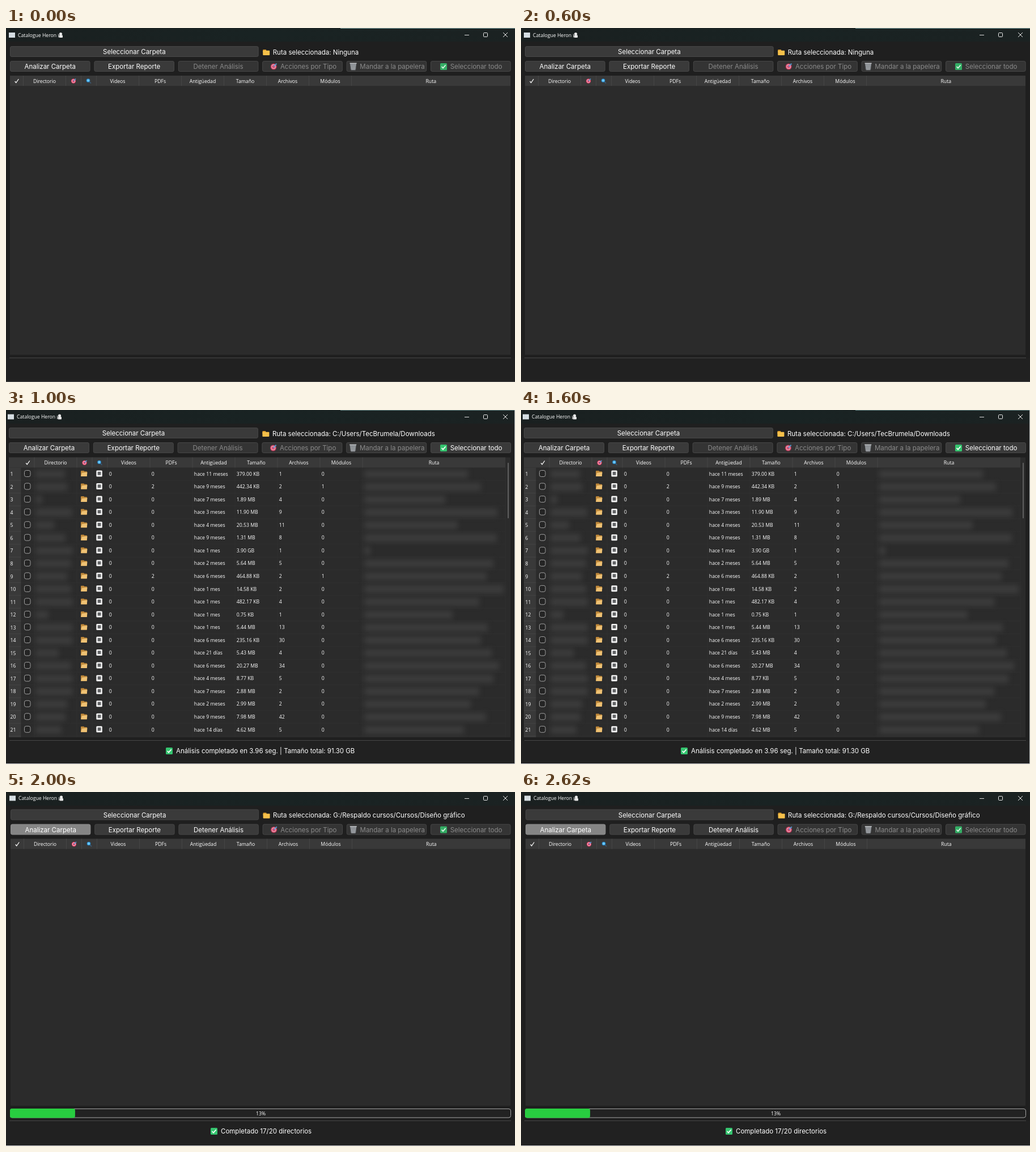
These frames come from a looping animation (898 by 624 pixels, 3030 ms). An HTML page with a canvas:

```html
<!DOCTYPE html>
<html lang="es">
<head>
<meta charset="utf-8">
<title>Catalogue Heron</title>
<style>
html, body { margin: 0; width: 100%; height: 100%; overflow: hidden; background: #1f1f1f; }
canvas { display: block; }
</style>
</head>
<body>
<canvas id="stage" width="898" height="624"></canvas>
<script>
const ctx = document.getElementById('stage').getContext('2d');
const UI = '11.5px Inter, sans-serif';
const SMALL = '8.7px "Open Sans", sans-serif';
const LABELS = ['✓', 'Directorio', '', '', 'Videos', 'PDFs', 'Antigüedad', 'Tamaño', 'Archivos', 'Módulos', 'Ruta'];
const BUTTONS = ['Analizar Carpeta', 'Exportar Reporte', 'Detener Análisis',
  'Acciones por Tipo', 'Mandar a la papelera', 'Seleccionar todo'];

// age | size | files, followed by PDFs and modules where they are not zero
const ROWS = `11 meses|379.00 KB|1
9 meses|442.34 KB|2|2|1
7 meses|1.89 MB|4
3 meses|11.90 MB|9
4 meses|20.53 MB|11
9 meses|1.31 MB|8
1 mes|3.90 GB|1
2 meses|5.64 MB|5
6 meses|464.88 KB|2|2|1
1 mes|14.58 KB|2
1 mes|482.17 KB|4
1 mes|0.75 KB|1
1 mes|5.44 MB|13
6 meses|235.16 KB|30
21 días|5.43 MB|4
6 meses|20.27 MB|34
4 meses|8.77 KB|5
7 meses|2.88 MB|2
2 meses|2.99 MB|2
9 meses|7.98 MB|42
14 días|4.62 MB|5`.split('\n').map(row => row.split('|'));
const NAME_ENDS = [104, 108, 64, 117, 85, 105, 118, 115, 108, 115, 118, 75, 118, 118, 93, 115, 118, 118, 108, 105, 98];
const PATH_ENDS = [815, 838, 775, 867, 797, 866, 643, 860, 848, 878, 835, 788, 850, 838, 857, 870, 860, 835, 820, 847, 808];

const SCENES = [
  { until: 1000, x: 7.5, y: 32.5, row2: 58.5, head: 84, bottom: 576, line: 581.5, titleX: 5, titleY: 12.5,
    tableX: 7, firstCol: 7, right: 890, enabled: [0, 1], path: 'Ninguna', topEdge: '#7fa3a3', bottomEdge: '#4a4a4a' },
  { until: 2000, x: 5.5, y: 31.5, row2: 57.5, head: 83.5, bottom: 577, line: 582.5, titleX: 3, titleY: 12,
    tableX: 5, firstCol: 26.5, right: 881, enabled: [0, 1, 5], path: 'C:/Users/TecBrumela/Downloads', rows: true,
    status: ['Análisis completado en 3.96 seg. | Tamaño total: 91.30 GB', 282, 601],
    topEdge: '#5f7f7f', rightEdge: '#b8bcbc', bottomEdge: '#c4c4c8' },
  { until: 3030, x: 8.5, y: 31, row2: 57, head: 82.5, bottom: 553, line: 579.5, titleX: 6, titleY: 11,
    tableX: 8, firstCol: 8, right: 890, enabled: [0, 1, 2], pressed: 0, path: 'G:/Respaldo cursos/Cursos/Diseño gráfico',
    progress: 13, status: ['Completado 17/20 directorios', 361, 598], bottomEdge: '#c4c4c8' }
];

function rect(x, y, w, h, color) {
  ctx.fillStyle = color;
  ctx.fillRect(x, y, w, h);
}
function round(x, y, w, h, r, fill, stroke) {
  ctx.beginPath();
  ctx.roundRect(x, y, w, h, r);
  if (fill) { ctx.fillStyle = fill; ctx.fill(); }
  if (stroke) { ctx.strokeStyle = stroke; ctx.lineWidth = 1; ctx.stroke(); }
}
function disc(x, y, r, color) {
  ctx.beginPath();
  ctx.arc(x, y, r, 0, 7);
  ctx.fillStyle = color;
  ctx.fill();
}
function stroke(points, color, width = 1) {
  ctx.beginPath();
  points.forEach(([x, y]) => ctx.lineTo(x, y));
  ctx.strokeStyle = color;
  ctx.lineWidth = width;
  ctx.stroke();
}
function text(str, x, y, font, color = '#fff', align = 'left') {
  ctx.font = font;
  ctx.fillStyle = color;
  ctx.textAlign = align;
  ctx.textBaseline = 'alphabetic';
  ctx.fillText(str, x, y + (font === UI ? 4.2 : 3.2));
}

// Icons are drawn around their centre
function target(x, y, r) {
  disc(x, y, r, '#d9365e');
  disc(x, y, r * .72, '#f3c3cf');
  disc(x, y, r * .5, '#d9365e');
  stroke([[x, y], [x + r * .95, y - r * .95]], '#4fa3e0', r * .35);
}
function folder(x, y, w, h) {
  round(x - w / 2, y - h / 2, w * .5, h * .5, 1, '#d99a2b');
  round(x - w / 2, y - h / 2 + h * .17, w, h * .83, 1, '#f5c04a');
}
function openFolder(x, y) {
  round(x - 5.5, y - 5, 6, 5, 1, '#b98236');
  round(x - 5.5, y - 3.8, 11, 8.8, 1, '#c08a3c');
  ctx.beginPath();
  [[-5.5, 5], [-3.5, -1.2], [6, -2.2], [5.2, 5]].forEach(([a, b]) => ctx.lineTo(x + a, y + b));
  ctx.fillStyle = '#efc274';
  ctx.fill();
}
function check(x, y) {
  round(x - 6, y - 6, 12, 12, 1.5, '#35c46f');
  stroke([[x - 3.4, y], [x - 1, y + 2.6], [x + 3.6, y - 2.8]], '#fff', 1.7);
}
function basket(x, y) {
  ctx.beginPath();
  [[-6, -6], [6, -6], [4, 6.5], [-4, 6.5]].forEach(([a, b]) => ctx.lineTo(x + a, y + b));
  ctx.fillStyle = '#777b80';
  ctx.fill();
  for (let i = -4; i <= 4; i += 2.6) {
    stroke([[x + i, y - 5], [x + i * .6, y + 6]], '#c3c6ca', .8);
    stroke([[x - 5, y + i], [x + 5, y + i]], '#b5b8bc', .6);
  }
  stroke([[x - 6, y - 5.8], [x + 6, y - 5.8]], '#d4d6d9', 1.4);
}
function lens(x, y) {
  stroke([[x, y], [x + 4, y + 4]], '#3b5b78', 1.6);
  disc(x - 1, y - 1, 3.3, '#2484c6');
  disc(x - 1, y - 1, 2.3, '#6cc8f5');
}
function sheet(x, y) {
  round(x - 5, y - 5.5, 10.5, 11, 1.5, '#f2f2f2');
  rect(x - 2.5, y - 3, 5.5, 5.5, '#4b4d50');
  for (let i = -1.5; i < 2; i += 2) rect(x - 2.5, y + i, 5.5, .6, '#999');
}

function titleBar({ titleX: x, titleY: y }) {
  const shade = ctx.createLinearGradient(0, 0, 898, 0);
  shade.addColorStop(0, '#1a2020');
  shade.addColorStop(.5, '#192323');
  shade.addColorStop(1, '#1b2222');
  rect(0, 0, 898, 24, shade);
  rect(x, y - 4.5, 11, 9, '#d5dde2');
  text('Catalogue Heron', x + 16, y, SMALL);
  const g = x + 91.5;
  disc(g, y - 2, 2.6, '#e8e8e8');
  round(g - 3, y, 6.5, 4.5, 1, '#e8e8e8');
  rect(g - 4.5, y - 2, 1, 6, '#bbb');
  const mid = Math.floor(y);
  stroke([[809, mid + .5], [817, mid + .5]], '#ddd');
  round(842.5, mid - 3.5, 7, 7, 1, null, '#eee');
  stroke([[877, mid - 4], [885, mid + 4]], '#eee');
  stroke([[885, mid - 4], [877, mid + 4]], '#eee');
}

function button(x, y, w, label, { on = true, pressed = false, icon, inset } = {}) {
  round(x, y, w, 18, 2.5, pressed ? '#858585' : on ? '#3a3a3a' : '#343434', pressed ? '#8c8c8c' : '#474747');
  const color = on ? '#fff' : '#8a8a8a', mid = y + 9.5;
  if (!icon) return text(label, x + w / 2, mid, UI, color, 'center');
  ctx.globalAlpha = on ? 1 : .85;
  icon(x + inset, mid, 5.5);
  ctx.globalAlpha = 1;
  text(label, x + inset + 11.7, mid, UI, color);
}

function toolbar(s) {
  const step = (749.5 - s.x) / 5;
  const icons = [, , , target, basket, check], insets = [, , , 19.5, 11.5, 22.5];
  button(s.x, s.y, 3 * step - 7.5, 'Seleccionar Carpeta');
  folder(s.x + 3 * step + 6.5, s.y + 10.5, 12, 10);
  text('Ruta seleccionada: ' + s.path, s.x + 3 * step + 18, s.y + 10, UI);
  BUTTONS.forEach((label, i) => button(s.x + i * step, s.row2, step - 7.8, label,
    { on: s.enabled.includes(i), pressed: s.pressed === i, icon: icons[i], inset: insets[i] }));
}

function table(s) {
  const edges = [0, 23.5, 98.5, 125.5, 152.5, 227.5, 302.5, 377.5, 452.5, 527.5, 602.5].map(x => x + s.firstCol);
  edges.push(s.right);
  const mid = s.head + 9.5;
  rect(s.tableX, s.head, 890 - s.tableX, s.bottom - s.head, '#2b2b2b');
  rect(s.tableX, s.head, s.right - s.tableX, 18, '#393939');
  if (s.rows) rows(s, edges);
  LABELS.forEach((label, i) => {
    const x = (edges[i] + edges[i + 1]) / 2;
    if (i) rect(edges[i] - .5, s.head, 1, 18, '#464646');
    if (i === 2) target(x, mid, 4.2);
    else if (i === 3) lens(x, mid);
    else if (i) text(label, x, mid, SMALL, '#fff', 'center');
    else stroke([[x - 3, mid + .5], [x - 1, mid + 3], [x + 3.5, mid - 3.5]], '#fff', 1.3);
  });
}

// A line of unreadable text behind frosted glass
function smudge(x, end, y) {
  ctx.filter = 'blur(4px)';
  rect(x, y - 7, end - x, 15, '#3b3b3b');
  ctx.filter = 'none';
}

function rows(s, edges) {
  const pitch = 22.54, top = 101.5;
  rect(5, top, 21.5, s.bottom - top, '#393939');
  ctx.save();
  ctx.beginPath();
  ctx.rect(5, top, 885, s.bottom - top);
  ctx.clip();
  edges.slice(1).forEach(x => rect(x - .5, top, 1, s.bottom - top, '#303030'));
  ROWS.forEach(([age, size, files, pdfs = 0, modules = 0], i) => {
    const y = 112.5 + i * pitch;
    rect(5, y + 11, 21.5, 1, '#444');
    rect(26.5, y + 11, 854.5, 1, '#303030');
    text(i + 1, 7.5, y + .5, SMALL);
    round(32.5, y - 6, 10.5, 11, 3, '#242424', '#a0a0a0');
    openFolder(137.5, y - .5);
    sheet(164.3, y - .5);
    [0, pdfs, 'hace ' + age, size, files, modules].forEach((value, k) =>
      text(value, edges[k + 4] + 2.8, y, SMALL));
    smudge(52, NAME_ENDS[i], y);
    smudge(632, PATH_ENDS[i], y);
  });
  ctx.restore();
  round(885.2, 93, 1.6, 98, .8, '#6e6e6e');
}

function footer(s) {
  rect(0, s.line, 898, 624 - s.line, '#212121');
  rect(6, s.line - .5, 885, 1, '#474747');
  if (s.progress) {
    round(7.5, 558.5, 883, 15.5, 3.5, '#222', '#a5a5a5');
    round(7, 558, 884 * s.progress / 100, 16.5, 3.5, '#28cc40');
    text(s.progress + '%', 449.5, 566.5, SMALL, '#fff', 'center');
  }
  if (s.status) {
    const [label, x, y] = s.status;
    check(x + 6, y);
    text(label, x + 18, y, UI);
  }
}

function windowEdges(s) {
  if (s.topEdge) rect(590, 0, 308, 1, s.topEdge);
  if (s.rightEdge) rect(897, 0, 1, 624, s.rightEdge);
  rect(0, 623, 898, 1, s.bottomEdge);
}

function draw() {
  const t = performance.now() % 3030;
  const scene = SCENES.find(s => t < s.until);
  rect(0, 0, 898, 624, '#1f1f1f');
  titleBar(scene);
  toolbar(scene);
  table(scene);
  footer(scene);
  windowEdges(scene);
  requestAnimationFrame(draw);
}
draw();
</script>
</body>
</html>
```
